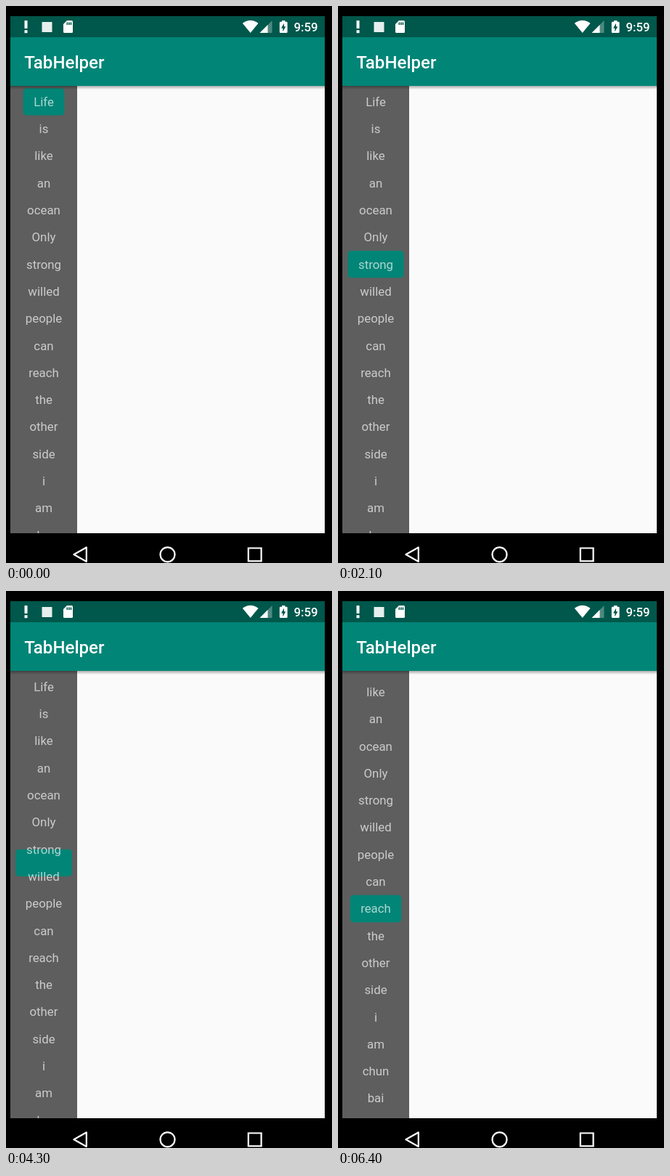
An HTML page that plays this animation: 449 px wide and 767 px high, repeating every 7200 ms.

```html
<!DOCTYPE html>
<html lang="en">
<head>
<meta charset="utf-8">
<title>TabHelper</title>
<style>
  html, body { margin: 0; width: 100%; height: 100%; overflow: hidden; background: #000; }
  svg { display: block; font: 16.84px Roboto, sans-serif; }
  #list { fill: #fff; fill-opacity: .68; text-anchor: middle; }
</style>
</head>
<body>
<svg width="449" height="767" viewBox="0 0 449 767">
  <defs>
    <clipPath id="pane"><path d="M6 110h92v616H6z"/></clipPath>
    <linearGradient id="shade" x2="0" y2="1">
      <stop stop-opacity=".32"/><stop offset="1" stop-opacity="0"/>
    </linearGradient>
  </defs>

  <path fill="#fafafa" d="M98 110h341v616H98z"/>
  <path fill="#5e5e5e" d="M6 110h92v616H6z"/>
  <g clip-path="url(#pane)">
    <g id="scroller">
      <rect id="chip" height="37.3" rx="4.8" fill="#008577"/>
      <g id="list"></g>
    </g>
  </g>
  <path fill="url(#shade)" d="M6 110h433v5H6z"/>

  <path fill="#00574b" d="M6 14h433v29H6z"/>
  <path fill="#008577" d="M6 43h433v67H6z"/>
  <text x="25.2" y="86" fill="#fff" font-size="24.06" font-weight="500">TabHelper</text>

  <!-- status icons -->
  <g fill="#fff">
    <path d="M25.5 20h4v11h-4zM25.5 33.2h4v4h-4z"/>
    <path fill="#e6efed" d="M49.5 22h14v14h-14z"/>
    <path d="M84 20h6.5q1.5 0 1.5 1.5v14q0 1.5-1.5 1.5h-10q-1.5 0-1.5-1.5V25z"/>
    <path fill="#00574b" d="M83.5 22.5h1.6v3.6h-1.6zM86.1 22.5h1.6v3.6h-1.6zM88.7 22.5h1.6v3.6h-1.6z"/>
    <path d="M336.7 37L325.8 23.7Q336.7 16 347.5 23.7z"/>
    <path opacity=".3" d="M349.5 37L366.5 20v17z"/>
    <path d="M349.5 37L360.5 26v11z"/>
    <path d="M380 20h4.4v1.8h2q1.2 0 1.2 1.2v12.8q0 1.2-1.2 1.2h-8.4q-1.2 0-1.2-1.2V23q0-1.2 1.2-1.2h2z"/>
    <path fill="#00574b" d="M383 23.8v4.4h2.3l-4 7v-4.8H379z"/>
    <text x="429.6" y="35" font-weight="500" text-anchor="end">9:59</text>
  </g>

  <!-- navigation bar -->
  <g fill="none" stroke="#fff" stroke-width="2.2">
    <path stroke-linejoin="round" d="M110.8 745.5v19.6L93.5 755.3z"/>
    <circle cx="222.5" cy="755.3" r="10"/>
    <path d="M333.8 746.5h17.8v17.8h-17.8z"/>
  </g>
</svg>
<script>
const WORDS = ("Life is like an ocean Only strong willed people can reach the other side " +
  "i am chun bai liang ting feng").split(" ");
const ROW = 37.3, MID_X = 52, FIRST_Y = 131.9, MAX_SCROLL = 172;
const LOOP = 7200, STEP = 100, SCROLL_LAG = 14;

// at: first visible change, lead: time already elapsed by then
const MOVES = [
  { at: 900, lead: 60, tab: 1 },
  { at: 1300, lead: 100, tab: 2 },
  { at: 1800, lead: 60, tab: 6 },
  { at: 2400, lead: 30, tab: 6, scroll: MAX_SCROLL, time: 100 },
  { at: 3300, lead: 60, tab: 8 },
  { at: 4200, lead: 100, tab: 6 },
  { at: 4600, lead: 60, tab: 7 },
  { at: 5100, lead: 60, tab: 8 },
  { at: 5600, lead: 60, tab: 9 },
  { at: 6200, lead: 100, tab: 10 }
];

const byId = id => document.getElementById(id);
const scroller = byId("scroller"), chip = byId("chip"), list = byId("list");
const clamp = (v, lo, hi) => Math.min(hi, Math.max(lo, v));
const mix = (a, b, k) => a + (b - a) * k;
const easeInOut = k => .5 - Math.cos(Math.PI * k) / 2;
const centred = tab => clamp(tab * ROW - 305.6, 0, MAX_SCROLL);

// fluid scroll easing: fast start, exponential settling
function fluid(k) {
  const raw = x => x < 1 ? x - 1 + Math.exp(-x) : mix(Math.exp(-1), 1, 1 - Math.exp(1 - x));
  return raw(k * 8) / raw(8);
}

const widths = WORDS.map((word, i) => {
  const label = document.createElementNS("http://www.w3.org/2000/svg", "text");
  label.textContent = word;
  label.setAttribute("x", MID_X);
  label.setAttribute("y", FIRST_Y + i * ROW + 5.9);
  list.append(label);
  return label.getComputedTextLength() + 28.9;
});

function stateAt(t) {
  let pos = 0, width = widths[0], scroll = 0;
  for (const { at, lead, tab, scroll: end = centred(tab), time = 250 } of MOVES) {
    if (t < at) break;
    const age = t - at + lead;
    const slide = easeInOut(clamp(age / 300, 0, 1));
    pos = mix(pos, tab, slide);
    width = mix(width, widths[tab], slide);
    scroll = mix(scroll, end, fluid(clamp((age - SCROLL_LAG) / time, 0, 1)));
  }
  return { pos, width, scroll };
}

function draw() {
  const t = Math.floor(performance.now() % LOOP / STEP) * STEP;
  const { pos, width, scroll } = stateAt(t);
  scroller.setAttribute("transform", `translate(0 ${-scroll})`);
  chip.setAttribute("x", MID_X - width / 2);
  chip.setAttribute("y", FIRST_Y + (pos - .5) * ROW);
  chip.setAttribute("width", width);
  requestAnimationFrame(draw);
}
draw();
</script>
</body>
</html>
```
